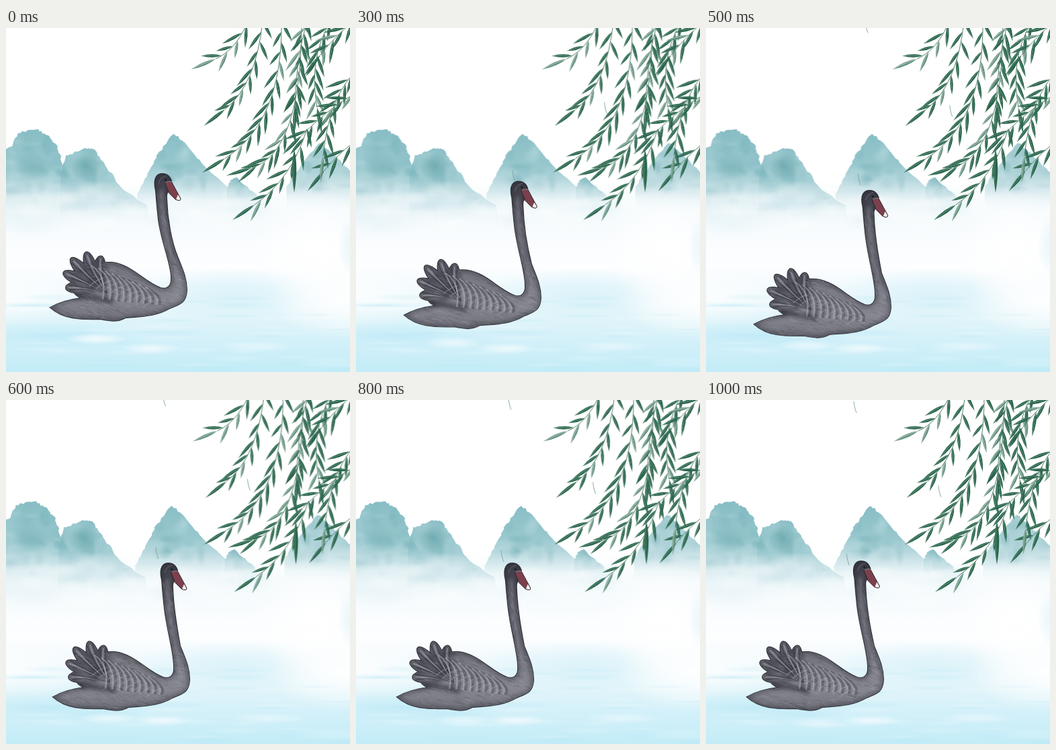
Recreate the animation shown at these times as an HTML page with a canvas. Size 512x512 px, loop 1100 ms.

```html
<!DOCTYPE html>
<html lang="en">
<head>
<meta charset="utf-8">
<title>Black swan under a willow</title>
<style>
html, body { margin: 0; width: 100%; height: 100%; overflow: hidden; background: #fff; }
canvas { display: block; width: 100vw; height: 100vh; }
</style>
</head>
<body>
<canvas id="stage" width="512" height="512"></canvas>
<script>
const SIZE = 512, PAD = 20, LOOP = 1100, HOLD = 100;
const ctx = document.getElementById('stage').getContext('2d');

function seeded(s) {
  return () => {
    s = (s * 1664525 + 1013904223) >>> 0;
    return s / 4294967296;
  };
}

function smooth(t, start, span) {
  const u = Math.min(1, Math.max(0, (t - start) / span));
  return u * u * (3 - 2 * u);
}

function layer(draw) {
  const c = document.createElement('canvas');
  c.width = c.height = SIZE + 2 * PAD;
  const g = c.getContext('2d');
  g.translate(PAD, PAD);
  draw(g);
  return c;
}

function soft(g, x, y, rx, ry, rgb, a) {
  const fill = g.createRadialGradient(0, 0, 0, 0, 0, 1);
  fill.addColorStop(0, `rgb(${rgb} / ${a})`);
  fill.addColorStop(.5, `rgb(${rgb} / ${a * .6})`);
  fill.addColorStop(1, `rgb(${rgb} / 0)`);
  g.save();
  g.translate(x, y);
  g.scale(rx, ry);
  g.fillStyle = fill;
  g.fillRect(-1, -1, 2, 2);
  g.restore();
}

function fade(g, top, bottom, stops) {
  const fill = g.createLinearGradient(0, top, 0, bottom);
  stops.forEach(([at, colour]) => fill.addColorStop(at, colour));
  return fill;
}

// ---- mountains: a few ridge points joined by a rough edge ----
function mountain(g, rnd, foot, strength, ...ridge) {
  const path = new Path2D(), last = ridge.length - 2;
  const left = ridge[0], wide = ridge[last] - left;
  let top = foot;
  path.moveTo(left, foot);
  for (let i = 0; i < last; i += 2) {
    const [x, y, u, v] = ridge.slice(i, i + 4);
    top = Math.min(top, y);
    for (let k = 0; k < 1; k += .125) {
      path.lineTo(x + (u - x) * k + rnd() * 3 - 1.5, y + (v - y) * k + rnd() * 3 - 1.5);
    }
  }
  path.lineTo(ridge[last], foot);
  g.save();
  g.globalAlpha = strength;
  g.fillStyle = fade(g, top, foot, [
    [0, 'rgb(130 186 194 / .95)'], [.4, 'rgb(142 194 201 / .9)'],
    [.7, 'rgb(176 213 220 / .65)'], [1, 'rgb(215 236 241 / 0)']
  ]);
  g.fill(path);
  g.clip(path);
  for (let i = 0; i < 60; i++) {
    const light = rnd() < .5, y = top + rnd() * (foot - top) * .7;
    soft(g, left + rnd() * wide, y, 5 + rnd() * 16, 4 + rnd() * 13,
      light ? '205 231 234' : '90 158 168', .16);
  }
  g.restore();
}

const mountains = layer(g => {
  const rnd = seeded(7);
  mountain(g, rnd, 278, .75, 418, 235, 445, 195, 468, 171, 492, 192, 535, 235);
  mountain(g, rnd, 262, .85, 328, 240, 334, 227, 342, 223, 376, 252);
  mountain(g, rnd, 280, 1, 196, 246, 217, 207, 225, 188, 250, 157, 266, 170, 290, 201, 345, 250);
  mountain(g, rnd, 300, .95, 80, 222, 89, 190, 118, 180, 131, 180, 148, 204, 170, 237, 215, 268);
  soft(g, 121, 207, 24, 22, '80 150 155', .5);
  mountain(g, rnd, 305, 1, -20, 188, 8, 178, 18, 156, 44, 150, 60, 158, 76, 176, 84, 202, 128, 275);
  soft(g, 42, 206, 30, 22, '92 158 167', .45);
  soft(g, 390, 262, 70, 20, '255 255 255', .5);
});

// ---- mist and water ----
const scenery = layer(g => {
  g.fillStyle = fade(g, 225, 512, [
    [0, 'rgb(238 247 250 / 0)'], [.2, 'rgb(240 248 251 / .7)'], [.32, 'rgb(249 252 254 / .9)'],
    [.45, '#fdfeff'], [.55, '#f2fafd'], [.7, '#e2f5fa'], [.85, '#d2f0f9'], [1, '#c2ecf7']
  ]);
  g.fillRect(-PAD, 225, SIZE + 2 * PAD, 310);
  const rnd = seeded(21);
  for (let i = 0; i < 40; i++) {
    soft(g, rnd() * 380, 240 + rnd() * 60, 15 + rnd() * 40, 8 + rnd() * 14,
      rnd() < .5 ? '255 255 255' : '214 235 241', .25);
  }
  soft(g, 335, 395, 150, 38, '206 238 247', .55);
  soft(g, 75, 458, 150, 22, '184 232 246', .5);
  soft(g, 0, 400, 140, 42, '255 255 255', .8);
  soft(g, 460, 325, 95, 85, '255 255 255', 1);
  soft(g, 500, 405, 110, 58, '255 255 255', .95);
  soft(g, 515, 325, 22, 45, '228 244 250', .8);
  for (let i = 0; i < 45; i++) {
    soft(g, rnd() * SIZE, 400 + rnd() * 110, 25 + rnd() * 50, 2 + rnd() * 4,
      rnd() < .55 ? '255 255 255' : '165 224 241', .18);
  }
});

function ripples(t) {
  const d = t * .03;
  soft(ctx, 135 + d, 463 + t * .018, 46, 9, '255 255 255', .75 - t * .0004);
  soft(ctx, 216 + d, 477, 46, 8, '255 255 255', .65);
  soft(ctx, 372 + d, 474, 60, 8, '255 255 255', .4);
}

// ---- willow ----
function leaf(g, rnd, x, y, angle, len) {
  const pale = rnd() < .15, w = 3 + len * .055;
  g.save();
  g.translate(x, y);
  g.rotate(angle);
  for (const side of [-1, 1]) {
    g.fillStyle = pale ? (side > 0 ? '#86a99a' : '#5f8e7a') : side > 0 ? '#3a7359' : '#28634a';
    g.beginPath();
    g.moveTo(0, 0);
    g.quadraticCurveTo(len * .4, side * w, len, 0);
    g.fill();
  }
  g.restore();
}

// a hanging twig: one curve with leaves on alternate sides and one at its tip
function twig(g, rnd, gap, x, y, cx, cy, u, v) {
  g.strokeStyle = '#55826d';
  g.lineWidth = 1;
  g.beginPath();
  g.moveTo(x, y);
  g.quadraticCurveTo(cx, cy, u, v);
  g.stroke();
  const count = Math.round((Math.hypot(cx - x, cy - y) + Math.hypot(u - cx, v - cy)) / gap);
  for (let i = 0; i <= count; i++) {
    const k = i / count, m = 1 - k;
    const angle = Math.atan2(m * (cy - y) + k * (v - cy), m * (cx - x) + k * (u - cx));
    const side = i === count ? 0 : i % 2 ? 1 : -1;
    leaf(g, rnd, m * m * x + 2 * m * k * cx + k * k * u, m * m * y + 2 * m * k * cy + k * k * v,
      angle + side * (.3 + rnd() * .3), side ? 25 + rnd() * 13 : 40);
  }
}

const willow = layer(g => {
  const rnd = seeded(5);
  const open = [
    [358, -5, 340, 34, 312, 46],
    [382, -10, 372, 85, 326, 121],
    [410, -10, 412, 140, 326, 194],
    [440, -10, 440, 185, 366, 208],
    [448, 150, 425, 225, 370, 263],
    [515, 172, 492, 190, 474, 212]
  ];
  const dense = [
    [448, -8, 432, 40, 430, 118],
    [482, -8, 450, 45, 463, 118],
    [515, -8, 490, 12, 468, 40],
    [515, 70, 480, 110, 472, 190],
    [515, 100, 480, 120, 440, 160]
  ];
  open.forEach(t => twig(g, rnd, 13, ...t));
  dense.forEach(t => twig(g, rnd, 10, ...t));
  leaf(g, rnd, 429, 181, Math.PI / 2, 64);
});

// loose slivers of leaf: start time, x, y
const slivers = [[200, 373, 108], [300, 233, 212], [500, 237, -10]];

function falling(t) {
  ctx.strokeStyle = 'rgb(120 160 148 / .7)';
  ctx.lineWidth = 1.2;
  for (const [from, x, y] of slivers) {
    if (t < from) continue;
    ctx.save();
    ctx.translate(x - (t - from) * .034, y + (t - from) * .024);
    ctx.beginPath();
    ctx.moveTo(0, 0);
    ctx.quadraticCurveTo(1, 10, 4, 17);
    ctx.stroke();
    ctx.restore();
  }
}

// ---- swan ----
function swan(g, t) {
  const rnd = seeded(90 + t);
  const hx = 5 * Math.sin(Math.PI * t / 1300), hy = -4 * smooth(t, 800, 300);
  const h = (x, y) => `${x + hx} ${y + hy} `;
  const line = (colour, width, path) => {
    g.strokeStyle = colour;
    g.lineWidth = width;
    g.stroke(path);
  };
  const bend = (...p) => new Path2D(`M${p[0]} ${p[1]} Q${p.slice(2).join(' ')}`);

  const shape = new Path2D(`M66 416 C82 407 96 404 112 402 C98 396 94 384 100 368
    C112 354 135 348 158 349 C188 353 204 377 230 387 C240 390 247 384 246 371
    C246 350 ${h(231, 318)} ${h(227, 285)} C${h(225, 268)} ${h(224, 255)} ${h(223, 242)}
    C${h(218, 222)} ${h(226, 217)} ${h(233, 217)} C${h(243, 217)} ${h(249, 228)} ${h(245, 237)}
    C${h(242, 246)} ${h(238, 242)} ${h(239, 254)} C${h(240, 285)} ${h(246, 318)} 255 340
    C262 358 269 372 269 390 C268 410 258 411 244 417 C222 430 200 429 178 431
    C165 438 155 436 140 433 C110 434 85 433 66 416Z`);
  const plumes = [];
  for (let i = 0; i < 5; i++) {
    const a = (178 + 25 * i) * Math.PI / 180, r = 46 + 11 * Math.sin(Math.PI * i / 4);
    const dx = Math.cos(a), dy = Math.sin(a);
    plumes.push([dx, dy, r]);
    const cx = 135 + dx * r / 2, cy = 385 + dy * r / 2;
    shape.moveTo(cx + dx * r / 2, cy + dy * r / 2);
    shape.ellipse(cx, cy, r / 2, 9, a, 0, 2 * Math.PI);
  }

  g.save();
  g.translate(6 * Math.min(1, t / 200) - 11 * smooth(t, 520, 300), 26 * smooth(t, 80, 480));
  g.lineCap = 'round';
  line('#2b2b33', 2, shape);
  g.fillStyle = fade(g, 215, 438, [
    [0, '#3a3b44'], [.12, '#45464f'], [.3, '#62636d'], [.6, '#70717b'], [.85, '#85868f'], [1, '#6c6d76']
  ]);
  g.fill(shape);

  g.save();
  g.clip(shape);
  g.filter = 'blur(3px)';
  line('rgb(140 141 150 / .6)', 6,
    new Path2D(`M${h(231, 244)} C${h(232, 285)} 240 335 254 370 Q258 385 252 402`));
  line('rgb(36 36 44 / .6)', 4, shape);
  line('rgb(36 36 44 / .7)', 7, bend(95, 398, 125, 399, 156, 407));
  g.filter = 'none';

  for (const [dx, dy, r] of plumes) {
    for (let s = -4; s <= 4; s += 4) {
      line(s ? 'rgb(45 45 54 / .5)' : 'rgb(165 166 175 / .6)', 1.8,
        bend(135 + dx * r * .9 - dy * s, 385 + dy * r * .9 + dx * s,
          135 + dx * r * .4 - dy * s, 385 + dy * r * .4, 150, 394));
    }
  }
  // overlapping rows of feathers
  for (let i = 0; i < 9; i++) {
    const x = 128 + i * 10, y = 354 + i * 4;
    line('rgb(52 52 62 / .35)', 4, bend(x + 4, y + 2, x + 26, y + 16, x + 20, 403 + i));
    line('rgb(178 179 187 / .5)', 2.2, bend(x, y, x + 22, y + 15, x + 16, 403 + i));
    line('rgb(165 166 175 / .35)', 1.8, bend(x + 18, y + 18, x + 8, y + 20, x - 4, y + 30));
  }
  // fine down on the body and the neck
  for (let i = 0; i < 500; i++) {
    const onNeck = i % 5 === 0, r = 3 + rnd() * 6, k = rnd();
    const x = onNeck ? 224 + k * 19 + rnd() * 22 : 75 + rnd() * 185;
    const y = onNeck ? 245 + k * 135 : 348 + k * 88;
    line(rnd() < .5 ? 'rgb(185 186 195 / .2)' : 'rgb(40 40 48 / .2)', .9,
      onNeck ? bend(x, y, x + 2, y + r / 2, x + 2, y + r) : bend(x, y, x + r, y, x + r * 1.3, y + r / 2));
  }
  g.restore();

  // bill, brow and eye
  g.translate(hx, hy);
  const bill = new Path2D('M237 231 Q243 226 247 230 Q254 243 260 254 Q260 259 252 255 L243 246Z');
  g.fillStyle = '#7c404c';
  g.fill(bill);
  g.fillStyle = '#f3eeee';
  g.fill(new Path2D('M256 248 L260 254 Q260 259 253 255Z'));
  line('#2c2229', 1, bill);
  line('rgb(190 190 196 / .7)', 1, bend(238, 230, 242, 227, 247, 229));
  line('rgb(125 126 136 / .5)', 1.2, bend(227, 231, 230, 221, 239, 220));
  g.fillStyle = '#15151b';
  g.fillRect(236, 225, 3, 2);
  g.restore();
}

let shown = -1;
function frame(now) {
  const step = Math.floor(now % LOOP / HOLD), t = step < 2 ? 0 : step * HOLD;
  if (t !== shown) {
    shown = t;
    ctx.fillStyle = '#fff';
    ctx.fillRect(0, 0, SIZE, SIZE);
    ctx.drawImage(mountains, -PAD - t * .005, -PAD);
    ctx.drawImage(scenery, -PAD, -PAD);
    ripples(t);
    swan(ctx, t);
    ctx.drawImage(willow, -PAD + t * .004, -PAD);
    falling(t);
  }
  requestAnimationFrame(frame);
}
frame(0);
</script>
</body>
</html>
```
